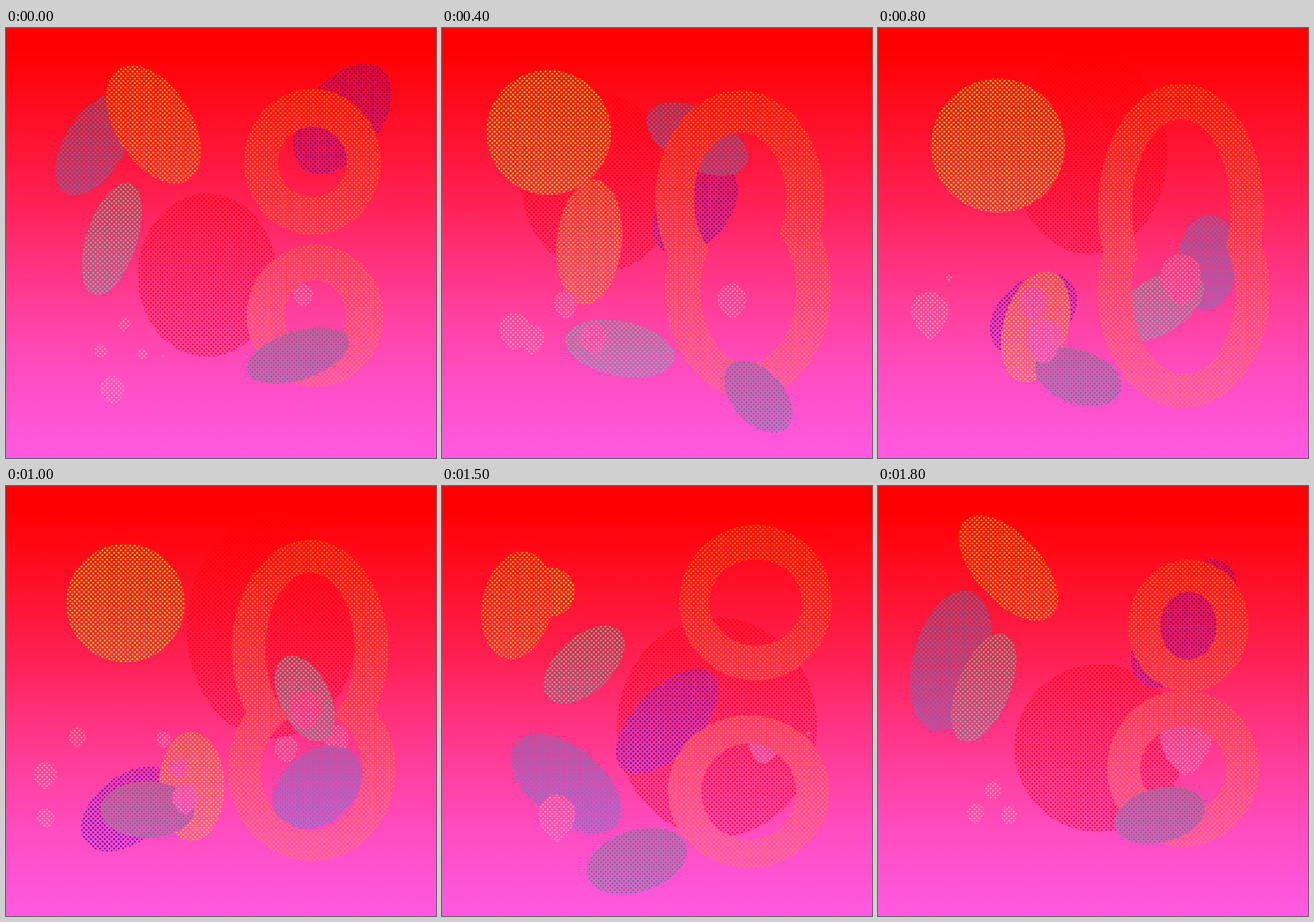
Recreate the animation shown at these times as an HTML page. Size 748 by 748 pixels, loop 1.9 s.

```html
<!DOCTYPE html>
<html lang="en">
<head>
<meta charset="utf-8">
<title>Halftone blobs</title>
<style>
html, body { margin: 0; width: 100%; height: 100%; overflow: hidden; background: #f00; }
svg { display: block; width: 100vw; height: 100vh; }
</style>
</head>
<body>
<svg viewBox="0 0 748 748" xmlns="http://www.w3.org/2000/svg">
  <defs id="defs">
    <linearGradient id="sky" x1="0" y1="0" x2="0" y2="1">
      <stop offset=".05" stop-color="#ff0000"/>
      <stop offset=".27" stop-color="#ff1433"/>
      <stop offset=".4" stop-color="#ff2052"/>
      <stop offset=".53" stop-color="#ff307a"/>
      <stop offset=".67" stop-color="#ff40a0"/>
      <stop offset=".8" stop-color="#ff4cc0"/>
      <stop offset="1" stop-color="#ff5ae2"/>
    </linearGradient>
    <pattern id="dots" x=".94" y="1.29" width="8.043" height="8.043" patternUnits="userSpaceOnUse">
      <circle cx="2.01" cy="2.01" r="1.65" fill="#fff"/>
      <circle cx="6.03" cy="6.03" r="1.65" fill="#fff"/>
    </pattern>
    <mask id="screen" maskUnits="userSpaceOnUse" x="0" y="0" width="748" height="748">
      <rect width="748" height="748" fill="url(#dots)"/>
    </mask>
    <mask id="rings" maskUnits="userSpaceOnUse" x="0" y="0" width="748" height="748">
      <g id="outer" fill="#fff"></g>
      <g id="holes" fill="#000"></g>
    </mask>
  </defs>
  <rect width="748" height="748" fill="url(#sky)"/>
  <g id="ink" mask="url(#screen)"></g>
</svg>
<script>
const STEP = 100, STEPS = 19;
const KEYS = [0, 2, 6, 10, 13, 16, 18];   // steps at which poses are given
const { sin, cos, atan2, PI, max, min, abs } = Math;
const byId = id => document.getElementById(id);
const ink = byId('ink');
const updates = [];

function set(el, attrs) {
  for (const k in attrs) el.setAttribute(k, attrs[k]);
  return el;
}

function node(tag, attrs, parent = ink) {
  return parent.appendChild(set(document.createElementNS('http://www.w3.org/2000/svg', tag), attrs));
}

// Vertical stage-wide gradient, returned as a paint reference
function fade(id, ...colors) {
  const g = node('linearGradient', {
    id, gradientUnits: 'userSpaceOnUse', x1: 0, x2: 0, y1: 50, y2: 700
  }, byId('defs'));
  colors.forEach((c, i) => node('stop', { offset: i / (colors.length - 1), 'stop-color': c }, g));
  return `url(#${id})`;
}

// Cyclic Hermite blend of the poses at step s
function blend(poses, s) {
  const n = KEYS.length;
  const at = i => KEYS[(i + n) % n] + Math.floor(i / n) * STEPS;
  const row = i => poses[(i + n) % n];
  let i = n - 1;
  while (KEYS[i] > s) i--;
  const span = at(i + 1) - at(i), u = (s - at(i)) / span;
  const u2 = u * u, u3 = u2 * u, ease = 3 * u2 - 2 * u3;
  return row(i).map((p, k) => {
    const q = row(i + 1)[k];
    const m0 = .8 * (q - row(i - 1)[k]) / (at(i + 1) - at(i - 1));
    const m1 = .8 * (row(i + 2)[k] - p) / (at(i + 2) - at(i));
    return p + (q - p) * ease + span * (m0 * (u3 - 2 * u2 + u) + m1 * (u3 - u2));
  });
}

// Drifting oval; pose: centre x, y, half length, half width, tilt in degrees.
// The tilt is blended as a doubled angle, so half turns do not matter.
function oval(fill, poses) {
  const el = node('ellipse', { fill });
  const rows = poses.map(([x, y, a, b, tilt]) => {
    const w = tilt * PI / 90;
    return [x, y, a, b, cos(w), sin(w)];
  });
  updates.push(s => {
    const [x, y, rx, ry, c, d] = blend(rows, s);
    set(el, { rx, ry, transform: `translate(${x} ${y}) rotate(${atan2(d, c) * 90 / PI})` });
  });
}

// Round bit that turns into a drop as it grows
function dropPath(x, y, r) {
  if (r < 2) return '';
  const tip = min(.6, r / 60), h = r * (1 + tip), w = .55 * r * (1 - tip);
  return `M${x - r} ${y}a${r} ${r} 0 0 1 ${2 * r} 0` +
    `C${x + r} ${y + .55 * h} ${x + w} ${y + h} ${x} ${y + h}` +
    `C${x - w} ${y + h} ${x - r} ${y + .55 * h} ${x - r} ${y}Z`;
}

function drop(fill, poses) {
  const el = node('path', { fill });
  updates.push(s => set(el, { d: dropPath(...blend(poses, s)) }));
}

// Short-lived bit that swells and shrinks around one step
function spark(fill, peak, x, y, r) {
  const el = node('path', { fill });
  updates.push(s => set(el, { d: dropPath(x, y, r * max(0, 1 - ((s - peak) / 2.5) ** 2)) }));
}

// Ring of the eight; pose: centre x, y, outer radii, hole radii
function ring(poses) {
  const outer = node('ellipse', {}, byId('outer')), hole = node('ellipse', {}, byId('holes'));
  updates.push(s => {
    const [cx, cy, a, b, c, d] = blend(poses, s);
    set(outer, { cx, cy, rx: a, ry: b });
    set(hole, { cx, cy, rx: c, ry: d });
  });
}

const pink = '#ff9cb4', beige = '#f0a4a6';

// Red
oval(fade('red', '#ff0000', '#ff000c', '#ff0038', '#ff0074', '#ff00a4'), [
  [350, 430, 121, 142, 0], [292, 348, 142, 149, 0], [283, 212, 130, 162, 0],
  [462, 247, 148, 192, 0], [518, 364, 180, 184, 0], [452, 440, 168, 190, 0],
  [384, 456, 147, 146, 0]
]);
// Purple
oval('#5600c2', [
  [585, 158, 110, 66, -52], [525, 222, 102, 58, -52], [355, 408, 82, 60, -45],
  [213, 562, 94, 58, -38], [318, 479, 112, 55, -45], [430, 370, 115, 60, -47],
  [532, 239, 128, 68, -55]
]);
// Lime disc: one swell per loop
const lime = node('circle', { fill: '#bcf400' });
updates.push(s => {
  const r = 120 * sin(PI * min(1, s / 18) ** .68);
  const sway = .16 * r * sin(2 * PI * (s - 5) / 17);
  set(lime, { cx: 192 + sway, cy: 188 + sway, r: max(0, r) });
});
spark(pink, 10, 487, 455, 20);
spark(pink, 10, 575, 437, 22);
spark(pink, 13, 637, 431, 9);
// Blue
oval(fade('blue', '#1a98dc', '#4a98f0'), [
  [155, 202, 100, 52, -58], [300, 127, 108, 57, -8], [558, 288, 84, 46, 58],
  [542, 525, 86, 62, -40], [364, 597, 100, 76, 10], [157, 465, 118, 58, 52],
  [127, 304, 125, 66, -75]
]);
// Teal
oval(fade('teal', '#38e2a0', '#34d0c8'), [
  [184, 367, 102, 44, -72], [203, 498, 96, 42, 58], [417, 577, 96, 52, -22],
  [520, 370, 80, 44, 65], [352, 287, 86, 52, 10], [207, 327, 86, 46, -58],
  [184, 351, 100, 46, -68]
]);
// Yellow
oval(fade('yellow', '#ffca00', '#ffb044'), [
  [257, 168, 114, 66, 58], [298, 257, 112, 58, 70], [222, 474, 106, 56, -65],
  [323, 523, 95, 57, 90], [212, 330, 115, 62, 48], [112, 161, 88, 60, -70],
  [227, 143, 112, 58, 48]
]);
drop(pink, [
  [517, 462, 17], [475, 460, 11], [536, 471, 38], [521, 384, 27],
  [608, 395, 14], [535, 462, 34], [536, 430, 46]
]);

// Eight that melts into a zero and splits again
node('rect', {
  width: 748, height: 748, mask: 'url(#rings)', fill: fade('orange', '#ff8400', '#fa8838')
});
ring([
  [533, 233, 119, 127, 60, 61], [513, 252, 139, 140, 68, 62], [526, 333, 150, 230, 90, 163],
  [529, 284, 136, 190, 78, 133], [542, 251, 122, 134, 70, 84], [546, 189, 135, 136, 82, 72],
  [540, 243, 105, 115, 49, 59]
]);
ring([
  [538, 501, 119, 124, 53, 62], [536, 488, 136, 136, 73, 78], [530, 432, 151, 229, 90, 166],
  [532, 495, 146, 158, 88, 104], [513, 487, 131, 126, 78, 79], [542, 546, 144, 137, 84, 86],
  [531, 492, 132, 136, 75, 74]
]);

// Green
oval('#10a06c', [
  [508, 570, 92, 42, -18], [608, 608, 74, 46, 55], [462, 659, 76, 44, 36],
  [246, 563, 82, 49, 0], [245, 680, 100, 48, -22], [390, 630, 84, 55, -15],
  [490, 573, 80, 47, -14]
]);

// Drops on the left
drop(beige, [
  [206, 515, 10], [208, 488, 8], [228, 474, 30], [300, 490, 16],
  [200, 600, 0], [198, 550, 20], [200, 528, 14]
]);
drop(beige, [
  [165, 561, 11], [129, 551, 11], [122, 497, 39], [68, 501, 20],
  [150, 600, 0], [185, 560, 15], [170, 568, 15]
]);
drop(beige, [
  [238, 567, 9], [270, 536, 8], [259, 542, 34], [311, 541, 22],
  [230, 620, 0], [212, 560, 14], [228, 571, 14]
]);
drop(beige, [
  [185, 626, 21], [180, 582, 43], [130, 510, 0], [69, 576, 15],
  [191, 611, 15], [198, 558, 36], [190, 635, 0]
]);
spark(beige, 2, 275, 571, 8);
spark(beige, 10, 124, 435, 15);
spark(pink, 10, 275, 440, 13);

let last = -1;
function draw() {
  const s = Math.floor(performance.now() / STEP) % STEPS;
  if (s !== last) {
    last = s;
    for (const update of updates) update(s);
  }
  requestAnimationFrame(draw);
}
draw();
</script>
</body>
</html>
```
